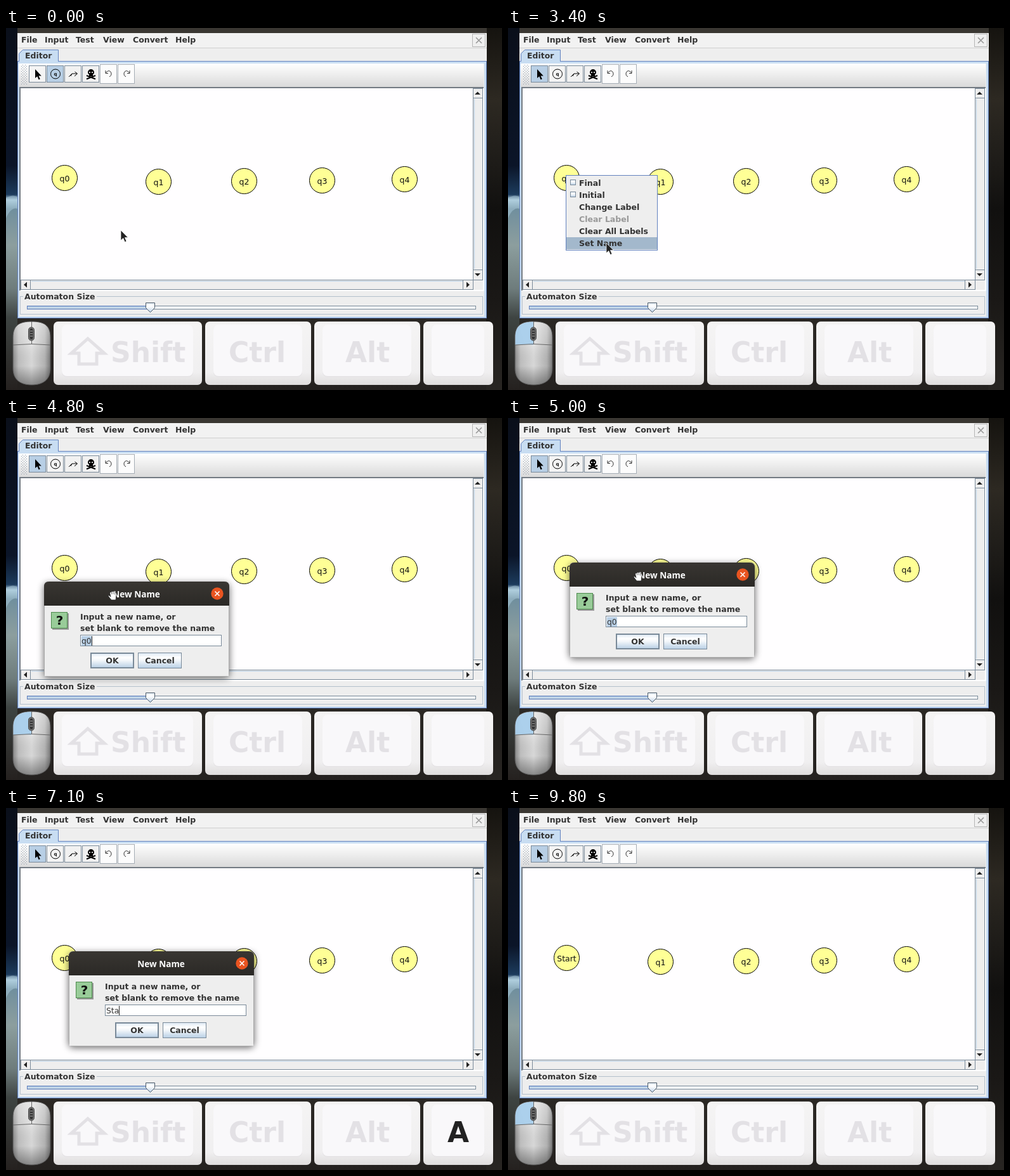
Recreate the animation shown at these times as an HTML page. Size 782 px wide and 571 px high, loop 9.9 s.

```html
<!DOCTYPE html>
<html lang="en">
<head>
<meta charset="utf-8">
<title>Renaming a state</title>
<style>
html, body { margin: 0; width: 100%; height: 100%; overflow: hidden; background: #24211e; }
svg { display: block; width: 782px; height: 571px; }
text { font: 12.5px "DejaVu Sans", sans-serif; fill: #111; white-space: pre; }
.b { font-weight: bold; fill: #333; }
.mid { text-anchor: middle; }
.key { font: bold 44px "DejaVu Sans", sans-serif; fill: #e3e1e5; }
.title { font: bold 13.6px "Noto Sans", sans-serif; fill: #fff; }
</style>
</head>
<body>
<svg id="stage" viewBox="0 0 782 571" xmlns="http://www.w3.org/2000/svg"></svg>
<script>
const LOOP = 9900;
const STEEL = '#7a8a99', BLUE = '#6382bf', PALE = '#b8cfe5', PANEL = '#eee';

const rect = (x, y, w, h, fill, extra = '') =>
  `<rect x="${x}" y="${y}" width="${w}" height="${h}" fill="${fill}" ${extra}/>`;
const box = (x, y, w, h, fill, stroke, extra = '') =>
  rect(x + .5, y + .5, w - 1, h - 1, fill, `stroke="${stroke}" ${extra}`);
const path = (d, fill, stroke = 'none', width = 1, extra = '') =>
  `<path d="${d}" fill="${fill}" stroke="${stroke}" stroke-width="${width}" ${extra}/>`;
const text = (x, y, s, cls = 'b', extra = '') => `<text x="${x}" y="${y}" class="${cls}" ${extra}>${s}</text>`;
const group = (id, body, extra = '') => `<g id="${id}" ${extra}>${body}</g>`;
const gradient = (id, stops, across = false) =>
  `<linearGradient id="${id}" x2="${across ? 1 : 0}" y2="${across ? 0 : 1}">` +
  stops.map(([o, c]) => `<stop offset="${o}" stop-color="${c}"/>`).join('') + '</linearGradient>';

const defs = '<defs>' +
  gradient('sky', [[0, '#0a0f1a'], [.38, '#0b1528'], [.46, '#1c3b5c'], [.475, '#b5d3e2'], [.5, '#708f9e'],
    [.6, '#8c9e9e'], [.72, '#6e7c7c'], [.8, '#3e4442'], [1, '#25211f']]) +
  gradient('trees', [[0, '#15130f'], [.2, '#2d2922'], [.38, '#1d1b18'], [.5, '#11100f'], [.75, '#1a1816'], [1, '#282522']]) +
  gradient('ground', [[0, '#2f2c29'], [.6, '#33302a'], [1, '#24211f']]) +
  gradient('bar', [[0, '#fff'], [1, '#dadada']]) +
  gradient('button', [[0, '#dde8f3'], [.3, '#fff'], [.5, '#f2f6fa'], [1, PALE]]) +
  gradient('track', [[0, '#8fb0d2'], [.5, '#cfe0f0'], [1, '#a3b8cc']]) +
  gradient('titlebar', [[0, '#393632'], [1, '#2b2926']]) +
  gradient('shell', [[0, '#8b8b8b'], [.15, '#c4c4c4'], [.5, '#dedede'], [.85, '#b8b8b8'], [1, '#7c7c7c']], true) +
  gradient('shade', [[0, '#ffffff60'], [.37, '#ffffff20'], [.7, '#00000008'], [1, '#00000060']]) +
  gradient('cap', [[0, '#f5f4f4'], [.8, '#f0eff0'], [1, '#dfdddd']]) +
  `<pattern id="grip" width="4" height="4" patternUnits="userSpaceOnUse">
    ${rect(0, 0, 1, 1, '#8a99a8')}${rect(2, 2, 1, 1, '#8a99a8')}</pattern>
  <pattern id="weave" width="3" height="3" patternUnits="userSpaceOnUse">
    ${rect(0, 0, 3, 3, '#a9d3a4')}${rect(0, 0, 1, 1, '#73b77a')}${rect(2, 1, 1, 1, '#8dc48c')}</pattern>
  <filter id="shadow" x="-20%" y="-20%" width="140%" height="150%"><feGaussianBlur stdDeviation="6"/></filter>
  <clipPath id="canvasClip"><rect width="782" height="571"/></clipPath></defs>`;

function backdrop() {
  return rect(0, 0, 782, 571, 'url(#ground)', '') + rect(0, 0, 18, 571, 'url(#sky)') +
    path('M0 268Q10 262 18 266V285Q8 282 0 300Z', '#a9c9da', 'none', 1, 'opacity=".5"') +
    rect(757, 0, 25, 571, 'url(#trees)') + rect(18, 0, 740, 8, '#3a3732');
}

function toolbar() {
  const tool = (i, icon) => box(36 + 28 * i, 59, 27, 27, i < 2 ? '#f4f4f4' : '#f1f1f1', STEEL, `id="tool${i}"`) + icon;
  const pointer = path('M46 65V79L49.3 76.3L51.6 81.5L53.8 80.5L51.5 75.4H55.8Z', '#000');
  const state = '<circle cx="78" cy="72.5" r="7.5" fill="none" stroke="#000"/>' +
    text(78, 75, 'q', 'mid', 'style="font-size:7px;font-weight:bold"');
  const arrow = path('M99 77L104 72H112M108.5 69L112.5 72L108 76M104 72L102 76', 'none', '#000');
  const skull = path('M129 70a5 5 0 1 1 10 0q0 3-2 3.5v2.5h-6v-2.5q-2-.5-2-3.5Z', '#000') +
    path('M127 75L141 80.5M141 75L127 80.5', 'none', '#000', 2) +
    '<circle cx="132" cy="70" r="1.1" fill="#fff"/><circle cx="136" cy="70" r="1.1" fill="#fff"/>';
  const undo = path('M157 71Q163 64 166 71Q167 75 163 77M157 67V71.5H161', 'none', '#333');
  const redo = path('M195 71Q189 64 186 71Q185 75 189 77M195 67V71.5H191', 'none', '#333');
  return rect(20, 56, 733, 37, 'url(#bar)') + rect(23, 58, 10, 31, 'url(#grip)') +
    tool(0, pointer) + tool(1, state) + tool(2, arrow) + tool(3, skull) +
    box(148, 57, 27, 31, '#fcfcfc', '#a5adb5') + undo + box(176, 57, 27, 31, '#fcfcfc', '#a5adb5') + redo;
}

function scrollbars() {
  const frame = (x, y, w, h) => box(x, y, w, h, PANEL, STEEL);
  return frame(736, 95, 16, 303) + frame(736, 110, 16, 272) + rect(738, 112, 1, 268, PALE) +
    path('M739 105H748L743.5 100.5Z', '#222') + path('M739 387H748L743.5 391.5Z', '#222') +
    frame(23, 397, 714, 16) + frame(38, 397, 683, 16) + rect(40, 399, 680, 1, PALE) +
    path('M33 400.5V409.5L28 405Z', '#222') + path('M726 400.5V409.5L731 405Z', '#222');
}

function slider() {
  return box(22, 423, 730, 29, 'none', '#b4c0cc') + rect(27, 420, 116, 8, PANEL) +
    text(29, 428, 'Automaton Size') +
    box(33, 438, 708, 6, '#f6f8fa', STEEL) + box(33, 438, 195, 6, 'url(#track)', BLUE) +
    path('M220.5 433.5H234.5V441.5L227.5 448.5L220.5 441.5Z', 'url(#button)', '#4c5a68');
}

function appWindow() {
  const menu = [[24, 'File'], [61, 'Input'], [110, 'Test'], [153, 'View'], [200, 'Convert'], [267, 'Help']];
  const states = [[92.5, 236.5], [240.5, 242.5], [375.5, 241.5], [498.5, 240.5], [628.5, 238.5]];
  return rect(18, 8, 740, 450, PANEL) + rect(18, 8, 740, 23, '#f2f2f2') + rect(18, 31, 740, 1, '#d0d0d0') +
    menu.map(([x, s]) => text(x, 23, s)).join('') +
    box(735, 9, 21, 21, '#f0f0f0', '#b5b5b5') + path('M741 15L750 24M750 15L741 24', 'none', '#999', 1.6) +
    path('M20.5 53V40.5L26.5 34.5H82.5V53', '#c8ddf2', BLUE) + text(30, 48, 'Editor') +
    box(18, 52, 740, 406, PANEL, BLUE) + rect(19, 53, 738, 3, '#c8ddf2') + rect(21, 52, 61, 2, '#c8ddf2') +
    rect(19, 53, 2, 404, '#c8ddf2') + rect(754, 53, 3, 404, '#c8ddf2') + rect(19, 455, 738, 2, '#c8ddf2') +
    toolbar() + rect(21, 93, 732, 2, '#737b83') + rect(21, 93, 2, 321, '#737b83') +
    rect(752, 95, 2, 320, '#fff') + rect(23, 413, 731, 2, '#fff') +
    rect(23, 95, 713, 302, '#fffeff') + scrollbars() + slider() +
    states.map(([x, y], i) => `<circle cx="${x}" cy="${y}" r="20" fill="#ffff96" stroke="#000"/>` +
      text(x, y + 5, 'q' + i, 'mid', `id="state${i}"`)).join('');
}

const ITEMS = ['Final', 'Initial', 'Change Label', 'Clear Label', 'Clear All Labels', 'Set Name'];
function popup() {
  return group('popup', box(91, 232, 145, 119, PANEL, BLUE) + rect(92, 0, 143, 19, '#a3b8cc', 'id="hover"') +
    ITEMS.map((s, i) => (i < 2 ? box(98, 239 + 19 * i, 9, 9, 'url(#button)', STEEL) : '') +
      text(112, 249 + 19 * i, s, 'b', i === 3 ? 'style="fill:#999"' : '')).join(''));
}

function dialog() {
  return group('dialog',
    rect(0, 3, 292, 149, '#000', 'rx="6" opacity=".6" filter="url(#shadow)"') +
    rect(0, 0, 292, 150, '#aaa', 'rx="6"') + rect(1, 30, 290, 119, PANEL) +
    path('M0 38V8Q0 0 8 0H284Q292 0 292 8V38Z', 'url(#titlebar)') +
    text(145.5, 25, 'New Name', 'title mid') +
    '<circle cx="273" cy="19" r="9.7" fill="#e95420"/>' +
    path('M269.5 15.5L276.5 22.5M276.5 15.5L269.5 22.5', 'none', '#fff', 1.6) +
    rect(13, 50, 26, 26, '#999') + box(11, 48, 26, 26, '#99cc99', '#4d8a4d') +
    text(24.5, 68, '?', 'mid', 'style="font-size:20px;font-weight:bold"') +
    text(57, 60, 'Input a new name, or') + text(57, 78, 'set blank to remove the name') +
    box(57, 84, 223, 18, '#fff', STEEL) + rect(59, 86, 16, 15, PALE, 'id="selection"') +
    text(59, 98, '', '', 'id="field" style="font-size:12.3px;fill:#333"') + rect(0, 86, 1, 15, '#222', 'id="caret"') +
    rect(74, 113, 67, 23, 'url(#button)', `id="ok" stroke="${STEEL}" stroke-width="2"`) +
    text(107.5, 129, 'OK', 'b mid') + box(148, 112, 69, 25, 'url(#button)', STEEL) +
    text(182.5, 129, 'Cancel', 'b mid'));
}

function mouse() {
  const shell = 'M40.5 463C60 463 70 469 70 488V537C70 555 58 563 40.5 563S11 555 11 537V488C11 469 21 463 40.5 463Z';
  return path(shell, 'url(#shell)') + path(shell, 'url(#shade)', '#555', 1) +
    path('M40 463.5C21 463.5 11.5 470 11.5 488V500Q25 498 40 500Z', '#a9d0ee', 'none', 1, 'id="left" opacity=".92"') +
    path('M41 463.5C60 463.5 69.5 470 69.5 488V500Q56 498 41 500Z', 'url(#weave)', 'none', 1, 'id="right"') +
    path('M11 500Q40 497 70 500M40.5 463V499', 'none', '#666') +
    rect(35.5, 472, 9, 21, '#777', 'rx="4.5" stroke="#444"') + rect(37.5, 474, 5, 17, '#333', 'rx="2.5"') +
    path('M38 478H42M38 482H42M38 486H42', 'none', '#aaa');
}

function keys() {
  const cap = (x, w) => rect(x, 463, w, 100, 'url(#cap)', 'rx="7"') +
    rect(x + 13, 469, w - 27, 82, '#e6e4e6', 'rx="8"') + rect(x + 13, 468, w - 27, 81, '#f9f8fa', 'rx="8"');
  return cap(75, 234) + cap(314, 167) + cap(486, 167) + cap(658, 110) +
    group('shift', path('M129 490L155 513H143V530H115V513H103Z', 'none', 'currentColor', 5) +
      text(165, 527, 'Shift', 'key', 'style="fill:currentColor"')) +
    text(351, 527, 'Ctrl', 'key') + text(535, 527, 'Alt', 'key') +
    text(713, 527, '', 'key mid', 'id="letter" style="fill:#222"');
}

const pointers = group('arrow', path('M0 0V16L3.8 12.6L6.4 18.6L9 17.4L6.4 11.6H11.3Z', '#222', '#fff', .7)) +
  group('hand', path('M3 5Q2 1 5 1.5Q6 0 8 1Q10 0 11 2Q14 2 13 6L12 14H5L1 9Q-1 6 2 7L4 9Z', '#fff', '#222', .8) +
    path('M5.5 2V5M8 2V5M10.5 3V5.5', 'none', '#555', .8));

const stage = document.getElementById('stage');
stage.innerHTML = defs + backdrop() + appWindow() + popup() + dialog() + mouse() + keys() + pointers;
const parts = Object.fromEntries([...stage.querySelectorAll('[id]')].map(e => [e.id, e]));

// Tracks hold [time, value...] and keep each value until the next time.
const POINTER = [[0, 181, 319], [300, 150, 230], [400, 102, 129], [600, 90, 112], [700, 68, 90], [800, 52, 72],
  [900, 46, 66], [1600, 50, 95], [1700, 70, 165], [1800, 90, 231], [2500, 92, 245], [2600, 105, 280],
  [2700, 140, 325], [2800, 155, 339], [3600, 155, 352], [3900, 123, 367], [4100, 33, 398], [4300],
  [5400, 200, 245], [5500, 210, 270], [5600, 216, 300], [5700, 217, 318], [5900, 205, 318], [6000, 185, 318],
  [6100, 165, 318], [6200, 148, 318], [6300, 138, 318], [6700], [7700, 138, 318], [8100, 205, 344],
  [8400, 240, 290], [8500, 269, 237], [8700]];
const DIALOG = [[3600, -69, 383], [4400, -69, 371], [4500, -69, 359], [4600, -40, 336], [4700, 8, 298],
  [4800, 60, 258], [4900, 90, 235], [5000, 97, 228], [5100, 98, 227], [5200, 99, 226]];
const TYPED = [[0, 'q0'], [6900, 'S'], [7000, 'St'], [7100, 'Sta'], [7300, 'Star'], [7600, 'Start']];
const LEFT = [[1100, 1400], [3300, 3500], [4300, 5400], [5800, 6700], [8300, 8500], [9800, LOOP]];

const at = (track, t) => track.findLast(k => k[0] <= t)?.slice(1) ?? [];
const within = (t, a, b) => t >= a && t < b;
const show = (part, on) => part.setAttribute('display', on ? 'inline' : 'none');
const move = (part, x, y) => part.setAttribute('transform', `translate(${x} ${y})`);

function drawField(t) {
  const [value] = at(TYPED, t);
  const dragging = within(t, 5900, 6300);
  const selStart = dragging ? Math.max(0, Math.min(16, (6200 - t) * .08)) : 0;
  parts.field.textContent = value;
  show(parts.selection, t < 6900);
  parts.selection.setAttribute('x', 59 + selStart);
  parts.selection.setAttribute('width', 16 - selStart);
  const end = parts.field.getComputedTextLength();
  parts.caret.setAttribute('x', 59 + Math.round(within(t, 5900, 6900) ? selStart : end));
  show(parts.caret, t >= 6500 || Math.floor(t / 500) % 2);
}

function draw(time) {
  const t = Math.floor(time / 100) * 100;
  const [x, y] = at(POINTER, t);
  const [dx, dy] = at(DIALOG, t);
  const open = within(t, 3600, 8400), grabbing = within(t, 4600, 5400);

  const selected = t < 1200 ? 1 : 0;
  [0, 1].forEach(i => parts['tool' + i].setAttribute('fill', i === selected ? PALE : '#f4f4f4'));
  parts.state0.textContent = t < 8400 ? 'q0' : 'Start';

  const row = Math.floor((y - 234) / 19);
  show(parts.popup, within(t, 1900, 3500));
  show(parts.hover, row >= 0 && row < 6 && row !== 3);
  parts.hover.setAttribute('y', 235 + 19 * row);

  show(parts.dialog, open);
  if (open) {
    move(parts.dialog, dx, dy);
    drawField(t);
    parts.ok.setAttribute('fill', t >= 8300 ? PALE : 'url(#button)');
  }

  show(parts.left, LEFT.some(([a, b]) => within(t, a, b)));
  show(parts.right, within(t, 1900, 2200));
  parts.shift.setAttribute('color', within(t, 6700, 7000) ? '#222' : '#e3e1e5');
  parts.letter.textContent = within(t, 6900, 7700) ? at(TYPED, t)[0].slice(-1).toUpperCase() : '';

  show(parts.arrow, x !== undefined);
  if (x !== undefined) move(parts.arrow, x, y);
  show(parts.hand, grabbing);
  if (grabbing) move(parts.hand, dx + 101, dy + 15);
}

const start = performance.now();
function tick() {
  draw((performance.now() - start) % LOOP);
  requestAnimationFrame(tick);
}
tick();
</script>
</body>
</html>
```
